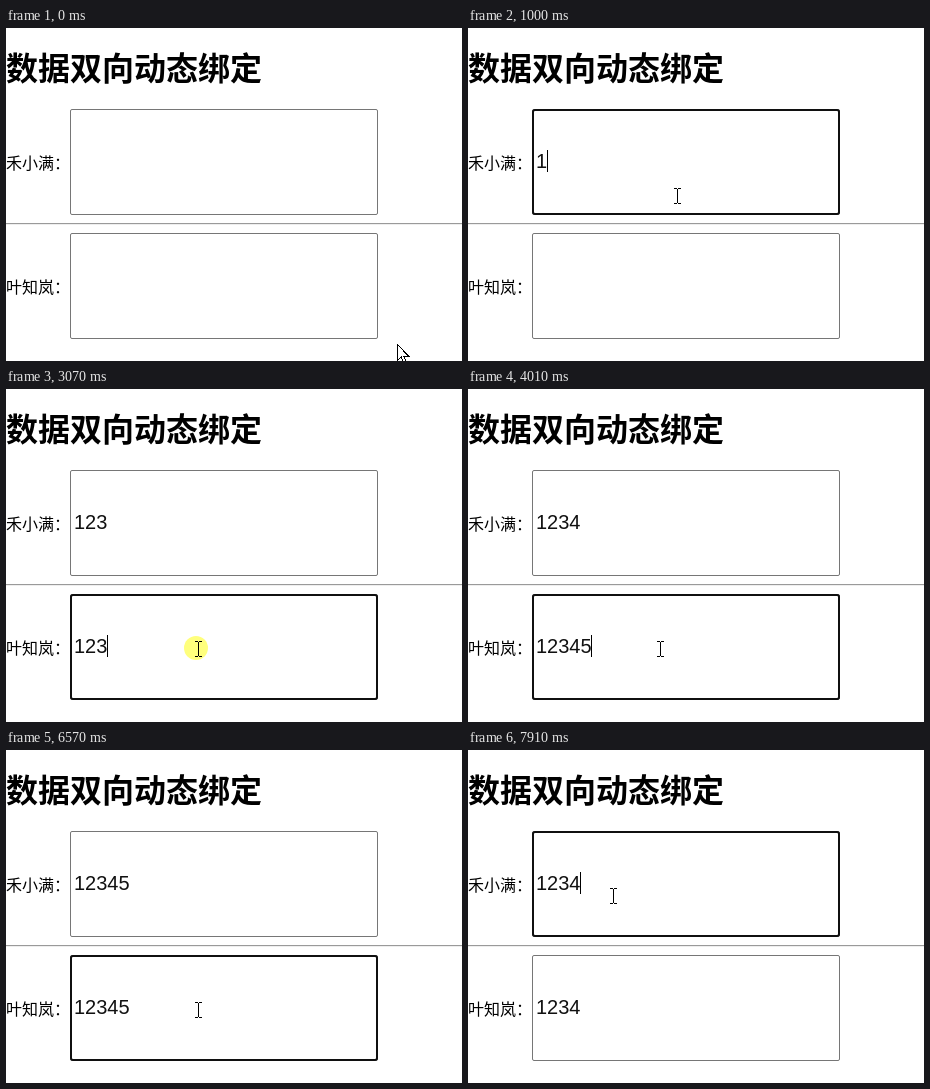
An HTML page that plays this animation: 456x333 px, repeating every 7990 ms.

```html
<!DOCTYPE html>
<html lang="zh-CN">
<head>
<meta charset="utf-8">
<title>数据双向动态绑定</title>
<style>
  html, body { margin: 0; width: 100%; height: 100%; overflow: hidden; background: #fff; }
  svg { display: block; width: 456px; height: 333px; }
  text { font-family: "Noto Sans CJK SC", "Noto Sans CJK", sans-serif; font-size: 16px; fill: #000; }
  .title { font-size: 32px; font-weight: 700; }
  .value { font-family: "Liberation Sans", Arial, sans-serif; font-size: 20px; fill: #111; }
  .box { fill: #fff; stroke: #767676; }
  .ring { fill: none; stroke: #101010; stroke-width: 2; }
  #arrow, #beam { shape-rendering: crispEdges; }
</style>
</head>
<body>
<svg viewBox="0 0 456 333">
  <defs>
    <rect id="box" class="box" x="64.5" y="81.5" width="307" height="105" rx="1.5"/>
    <rect id="ring" class="ring" x="65" y="82" width="306" height="104" rx="2"/>
  </defs>
  <text class="title" x="0" y="52">数据双向动态绑定</text>
  <path d="M0 195.5H456" stroke="#9a9a9a"/>
  <path d="M0 196.5H456" stroke="#eee"/>

  <g>
    <text x="0" y="141">禾小满：</text>
    <use href="#box"/>
    <use class="focus" href="#ring"/>
  </g>
  <g transform="translate(0 124)">
    <text x="0" y="141">叶知岚：</text>
    <use href="#box"/>
    <use class="focus" href="#ring"/>
  </g>

  <circle id="glow" r="12" fill="#ffff7d"/>
  <text class="value" x="68" y="140"></text>
  <text class="value" x="68" y="264"></text>
  <rect id="caret" width="1" height="22"/>

  <path id="arrow" d="M.5 .5V16.5L4.2 12.9L6.8 18.5L9.2 17.5L6.7 12H11.5Z" fill="#fff" stroke="#000"/>
  <path id="beam" d="M-3 -7.5H0M1 -7.5H4M.5 -7V7M-3 7.5H0M1 7.5H4" fill="none" stroke="#000"/>
</svg>
<script>
  const LOOP = 7990, TICK = 80, BLINK = 540, GAP = 124;
  const HOME = { x: 391, y: 316 };

  // The pointer travels from "go" to "at"; a press focuses a field.
  const trips = [
    { go: 70, at: 470, x: 209, y: 168, press: 550, release: 690, field: 0 },
    { go: 2310, at: 2470, x: 205, y: 200 },
    { go: 2550, at: 2710, x: 192, y: 260, press: 2610, release: 3240, field: 1 },
    { go: 7120, at: 7520, x: 145, y: 146, press: 7600, release: 7910, field: 0 }
  ];
  const clicks = trips.filter(trip => trip.press);

  // Keys go to the focused field; the bound field follows after "lag".
  const typing = { times: [1000, 1620, 2020, 3550, 4010, 5020], lag: 160 };
  const erasing = { times: [5950, 6650], lag: 80 };

  const $ = id => document.getElementById(id);
  const rings = document.querySelectorAll('.focus');
  const values = document.querySelectorAll('.value');
  const show = (el, on) => el.setAttribute('visibility', on ? 'visible' : 'hidden');
  const place = (el, x, y) => el.setAttribute('transform', `translate(${x} ${y})`);

  const lastClick = t => clicks.filter(c => c.press <= t).pop();
  const focusAt = t => lastClick(t)?.field;

  const countKeys = ({ times, lag }, field, t) =>
    times.filter(k => k + (focusAt(k) === field ? 0 : lag) <= t).length;
  const lengthAt = (field, t) => countKeys(typing, field, t) - countKeys(erasing, field, t);

  // Blinking restarts with each key or release and pauses while pressed.
  function caretOn(t) {
    const click = lastClick(t);
    if (!click) return false;
    if (t < click.release) return true;
    const keys = [...typing.times, ...erasing.times].filter(k => k <= t);
    const since = t - Math.max(click.release, ...keys);
    return Math.floor(since / BLINK) % 2 === 0;
  }

  function pointerAt(t) {
    let { x, y } = HOME;
    for (const trip of trips) {
      if (t < trip.go) break;
      const tick = Math.floor((t - trip.go) / TICK) * TICK + TICK;
      const p = Math.min(1, tick / (trip.at - trip.go + TICK));
      x += (trip.x - x) * p;
      y += (trip.y - y) * p;
    }
    return [Math.round(x), Math.round(y)];
  }

  const overField = (x, y) =>
    x >= 64 && x < 372 && y >= 81 && (y - 81) % GAP < 106;

  function draw(t) {
    const active = focusAt(t);
    values.forEach((el, i) => {
      const text = '123456'.slice(0, lengthAt(i, t));
      if (el.textContent !== text) el.textContent = text;
      show(rings[i], i === active);
    });
    show($('caret'), caretOn(t));
    if (active !== undefined) {
      place($('caret'), 68 + lengthAt(active, t) * 11, 122 + active * GAP);
    }

    const [x, y] = pointerAt(t);
    const beam = overField(x, y);
    show($('beam'), beam);
    show($('arrow'), !beam);
    place($('beam'), x, y);
    place($('arrow'), x, y);
    show($('glow'), clicks.some(c => t >= c.press && t < c.release));
    place($('glow'), x - 2, y - 1);
  }

  const began = performance.now();
  function loop() {
    draw((performance.now() - began) % LOOP);
    requestAnimationFrame(loop);
  }
  loop();
</script>
</body>
</html>
```
